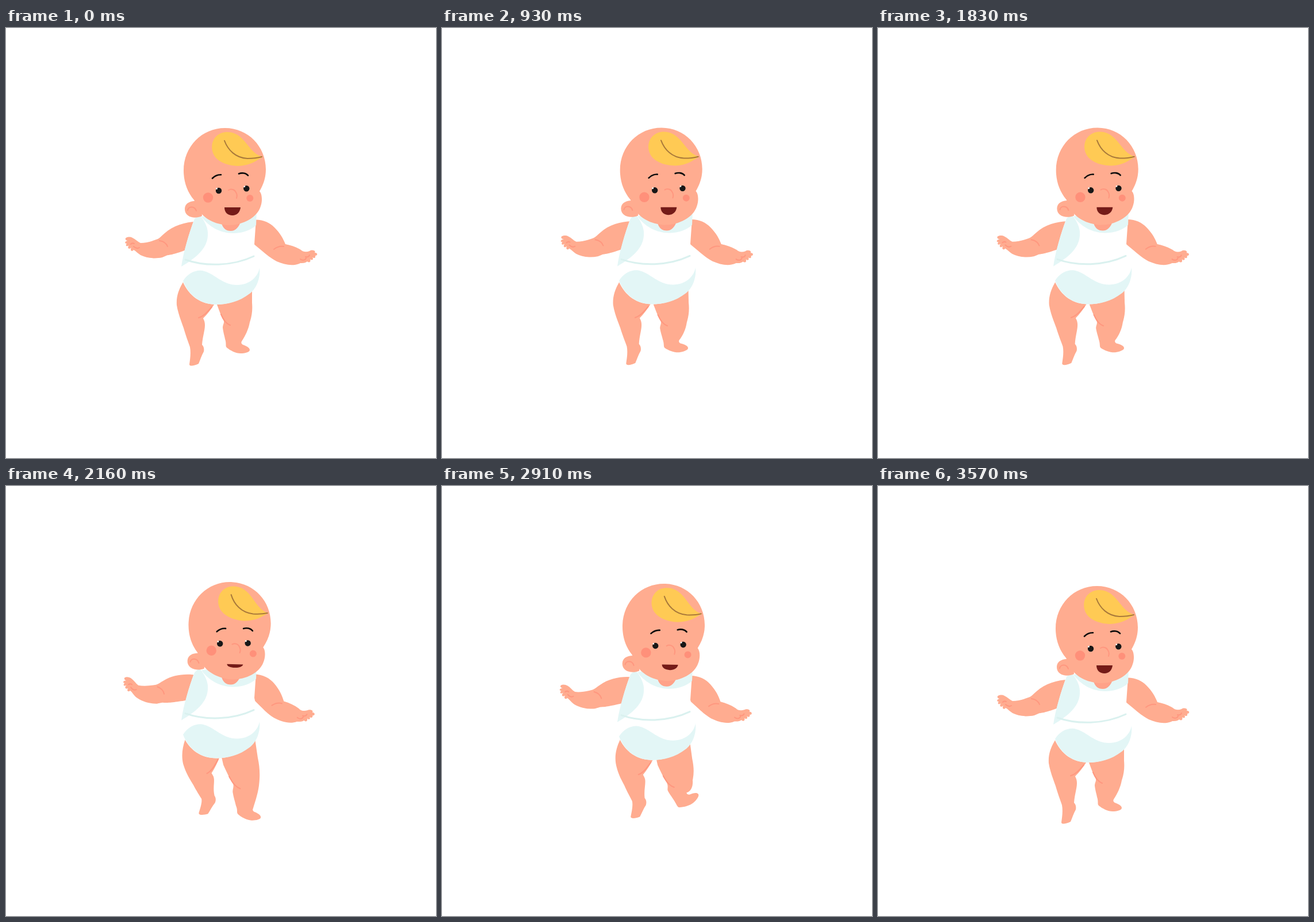
Write an HTML page that moves like this. It is 748 by 748 pixels and loops after 3600 ms.

```html
<!DOCTYPE html>
<html lang="en">
<head>
<meta charset="utf-8">
<title>Walking baby</title>
<style>
  html, body { margin: 0; width: 100%; height: 100%; overflow: hidden; background: #fff; }
  svg { display: block; width: 100vw; height: 100vh; }
  .skin { fill: #ffac90; }
  .neck { fill: #ffa289; }
  .shade { fill: #e3f6f6; }
  .blush { fill: #ff907a; }
  .fold, .brow, .strand, .seam { fill: none; stroke-linecap: round; }
  .fold { stroke: #ff977f; stroke-width: 2; }
  .brow { stroke: #0c0c0c; stroke-width: 2.6; }
  .strand { stroke: #a9793a; stroke-width: 2; }
  .seam { stroke: #daf1ef; stroke-width: 3; }
</style>
</head>
<body>
<svg viewBox="0 0 748 748">
  <path id="legL" class="skin"/>
  <path id="foldL" class="fold"/>
  <path id="legR" class="skin"/>
  <path id="foldR" class="fold"/>

  <g id="armL">
    <path class="skin" d="M332 337C312 337 290 344 276 357C271 361 268 365 264 367C254 371 243 374 234 374
      C229 372 225 367 220 365C215 362 206 364 208 368C209 370 212 370 213 370C207 370 205 375 210 375
      C207 379 210 381 214 378C210 383 214 386 218 382C215 387 219 390 222 386C226 388 229 392 234 395
      C244 400 258 402 272 399C277 397 280 395 283 395C295 393 305 389 330 380Z"/>
    <path class="fold" d="M267 370C274 371 279 375 281 380"/>
    <path class="fold" d="M217 376C219 374 221 374 223 375M222 380C225 383 229 384 232 382"/>
  </g>
  <g id="armR">
    <path class="skin" d="M428 334C445 332 458 338 467 347C477 357 482 366 486 376C496 378 505 381 513 386
      C517 390 523 390 528 388C532 385 540 387 537 391C542 390 543 396 538 396C539 400 536 401 533 399
      C536 403 532 405 529 402C531 407 527 409 524 406C521 409 516 409 512 409
      C500 415 485 412 471 406C460 400 453 394 447 389L424 370Z"/>
    <path class="fold" d="M466 385C471 381 477 379 483 380"/>
    <path class="fold" d="M512 402C516 405 521 404 522 400M521 398C525 399 527 398 528 395"/>
  </g>

  <g id="body">
    <path fill="#fff" d="M330 325L327 334C318 358 310 388 305 415L307 440C318 467 340 481 366 481
      C404 481 441 458 441 417L432 376L436 318Z"/>
    <path class="shade" d="M328 332L336 324C347 337 352 349 351 361C350 382 334 398 305 415C309 388 318 358 328 332Z"/>
    <path class="shade" d="M340 328C352 345 372 357 395 357C412 357 427 351 435 343L436 318H400Z"/>
    <path class="neck" d="M374 335C376 349 383 353 391 353C399 353 405 347 409 335Z"/>
    <path class="shade" d="M308 440C317 425 334 419 345 423C363 428 377 447 402 447C424 447 439 432 441 417
      C443 436 435 454 424 462C406 476 385 481 366 481C340 481 318 466 308 440Z"/>
    <path class="seam" d="M312 403C346 415 393 415 431 397"/>
  </g>

  <g id="head">
    <path class="skin" d="M340 302C329 299 311 301 311 315C311 329 328 333 341 327Z"/>
    <path class="skin" d="M381 174C421 174 452 206 452 246C452 260 448 272 441 284C446 289 446 302 443 310
      C437 330 412 343 387 343C362 342 343 330 336 317C333 310 331 306 327 299C315 285 309 267 309 248
      C309 206 341 174 381 174Z"/>
    <path class="fold" d="M316 317C317 310 328 309 331 318"/>
    <circle class="blush" cx="351.5" cy="295" r="8.7"/>
    <circle class="blush" cx="424.3" cy="296" r="6"/>
    <path fill="#ffca54" d="M446 224C428 219 421 201 408 190C398 181 385 179 374 183C362 188 356 200 359 214
      C363 232 385 240 405 240C425 239 436 231 446 224Z"/>
    <path class="strand" d="M380 196C386 212 399 226 420 227C430 227 438 226 445 224"/>
    <path class="brow" d="M359 261.5C363 257.500 369 255 374 255.200M405 253.500C410 251.500 417 252 421 256.500"/>
    <path class="fold" d="M387 282C392 279 398 281 400 286C402 289 402 293 401 296"/>
    <g id="eyes" fill="#171717">
      <circle cx="370" cy="283" r="5.2"/>
      <circle cx="418.3" cy="279.3" r="5.2"/>
      <g fill="#fff"><circle cx="366.5" cy="279.5" r="1.4"/><circle cx="414.800" cy="275.8" r="1.4"/></g>
    </g>
    <path id="mouth" fill="#741b18" d="M380 0H408C407 9 401 14 394 14C386 14 380 9 380 0Z"/>
  </g>
</svg>
<script>
const $ = id => document.getElementById(id);
const CYCLE = 900, WALK = 870, STEP = 30;

// Key columns: time, knee x y, ankle x y, foot angle
const legs = [
  {
    id: 'L', hip: [335, 450], sway: 6,
    keys: [
      [0, 324, 508, 331, 560, 0],
      [210, 331, 507, 342, 551, 4],
      [435, 343.5, 506, 356, 543.5, 12],
      [540, 338, 506, 349.5, 540.5, 29],
      [690, 330, 504, 341, 542, 33],
      [870, 324, 508, 331, 560, 0]
    ],
    outline: [
      ['thigh', 'M316 428L307 444C300 456 296 468 297 482'],
      ['shin', 'C299 495 304 508 309 522C313 536 317 546 320 555'],
      ['foot', 'C322 566 320 577 319 585C319 589 327 588 335 584C338 577 340 570 344 563C345 558 344 554 341 551'],
      ['shin', 'C342 537 346 526 346 517'],
      ['thigh', 'C346 510 344 508 343 505C350 498 357 489 362 481L370 446Z']
    ],
    fold: [['thigh', 'M358 485C352 492 344 502 335 504']]
  },
  {
    id: 'R', hip: [400, 450], sway: 6,
    keys: [
      [0, 401, 513, 396, 550, 0],
      [210, 414, 518, 418, 546.5, -41],
      [435, 419.5, 521, 414.5, 574.5, 24],
      [540, 414, 518, 409, 569, 18],
      [690, 407, 516, 401.5, 558.5, 11],
      [870, 401, 513, 396, 550, 0]
    ],
    outline: [
      ['thigh', 'M364 450L367 481C371 492 374 500 378 508'],
      ['shin', 'C381 512 377 516 377 521C378 530 380 535 381 541'],
      ['foot', 'C384 550 381 553 384 556C390 561 400 566 408 566C415 566 424 564 424 560C424 556 418 553 412 551C409 549 409 547 410 545'],
      ['shin', 'C416 536 422 524 424 512'],
      ['thigh', 'C428 500 429 490 428 478L428 436Z']
    ],
    fold: [['thigh', 'M374 498C379 510 385 515 390 517']]
  }
];

// Values of the key columns at time t
function sample(keys, t) {
  const i = Math.max(1, keys.findIndex(k => k[0] >= t));
  const a = keys[i - 1], b = keys[i], f = (t - a[0]) / (b[0] - a[0]);
  return a.map((v, j) => v + (b[j] - v) * f);
}

// Maps points along the rest bone a0-b0 to the posed bone a-b
function bone(a0, b0, a, b) {
  const dx0 = b0[0] - a0[0], dy0 = b0[1] - a0[1], dx = b[0] - a[0], dy = b[1] - a[1];
  const len0 = Math.hypot(dx0, dy0), len = Math.hypot(dx, dy);
  return (x, y) => {
    const rx = x - a0[0], ry = y - a0[1];
    const along = (rx * dx0 + ry * dy0) / len0 / len0;
    const across = (ry * dx0 - rx * dy0) / len0 / len;
    return [a[0] + along * dx - across * dy, a[1] + along * dy + across * dx];
  };
}

function turn(c0, c, deg) {
  const r = deg * Math.PI / 180, cos = Math.cos(r), sin = Math.sin(r);
  return (x, y) => [
    c[0] + (x - c0[0]) * cos - (y - c0[1]) * sin,
    c[1] + (x - c0[0]) * sin + (y - c0[1]) * cos
  ];
}

const bend = (parts, maps) => parts.map(([name, d]) =>
  d.replace(/([\d.]+) ([\d.]+)/g, (_, x, y) =>
    maps[name](+x, +y).map(v => v.toFixed(2)).join(' '))).join('');

function poseLeg(leg, t, u) {
  const [, kx0, ky0, ax0, ay0] = leg.keys[0];
  const [, kx, ky, ax, ay, angle] = sample(leg.keys, t);
  const hip = [leg.hip[0] + leg.sway * u, leg.hip[1] - 8.7 * u];
  const maps = {
    thigh: bone(leg.hip, [kx0, ky0], hip, [kx, ky]),
    shin: bone([kx0, ky0], [ax0, ay0], [kx, ky], [ax, ay]),
    foot: turn([ax0, ay0], [ax, ay], angle)
  };
  $('leg' + leg.id).setAttribute('d', bend(leg.outline, maps));
  $('fold' + leg.id).setAttribute('d', bend(leg.fold, maps));
}

function place(id, x, y, deg = 0, cx = 0, cy = 0) {
  $(id).setAttribute('transform', `translate(${x} ${y}) rotate(${deg} ${cx} ${cy})`);
}

function draw() {
  const t = Math.min(Math.floor(performance.now() / STEP) * STEP % CYCLE, WALK);
  const u = (1 - Math.abs(1 - 2 * t / WALK)) * 1.036;
  for (const leg of legs) poseLeg(leg, t, u);
  place('body', 0, -8.7 * u);
  place('armL', -1.6 * u, -9.4 * u, 13.2 * u, 330, 352);
  place('armR', 0, -6.4 * u, 6 * u, 440, 348);
  place('head', 3.5 * u, -7.6 * u, 4 * u, 390, 340);
  place('eyes', -5 * u, -u);
  $('mouth').setAttribute('transform',
    `translate(0 ${312 + 5 * u}) rotate(${-2 * u} 394 0) scale(1 ${1 - 0.67 * u})`);
  requestAnimationFrame(draw);
}
draw();
</script>
</body>
</html>
```
